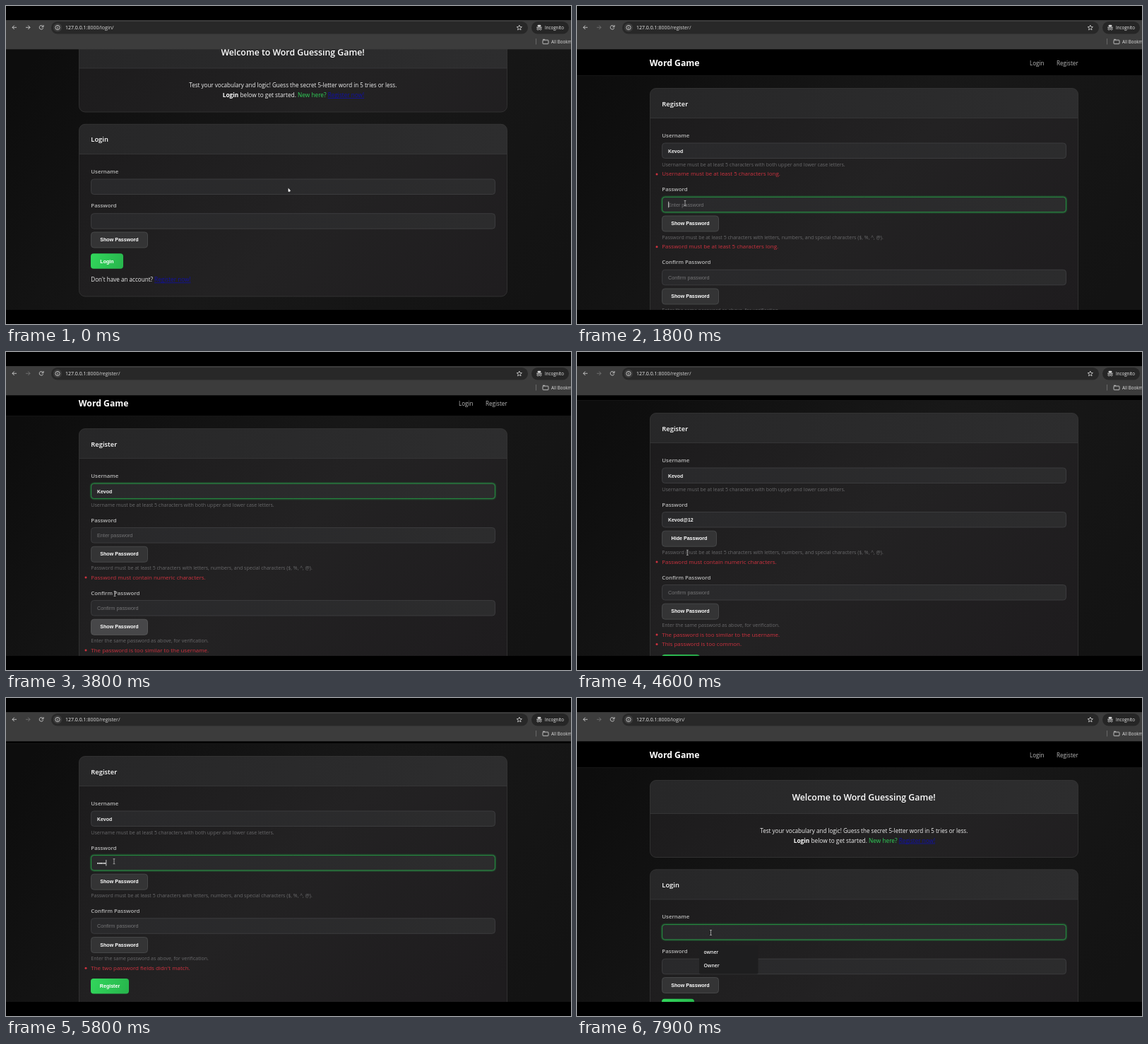
An HTML page with a canvas that plays this animation: 800x450 px, repeating every 8000 ms.

```html
<!DOCTYPE html>
<html lang="en">
<head>
<meta charset="utf-8">
<title>Word Game</title>
<style>
html, body { margin: 0; width: 100%; height: 100%; overflow: hidden; background: #000; }
canvas { display: block; width: 800px; height: 450px; }
</style>
</head>
<body>
<canvas id="stage" width="800" height="450"></canvas>
<script>
const ctx = document.getElementById('stage').getContext('2d');
const UI = '"Open Sans", "Noto Sans", sans-serif';
const FORM = '"Liberation Sans", Arial, sans-serif';
const RED = '#cf323f', GREEN = '#30d158', LABEL = '#b8b8b8', HELP = '#69696b', BLUE = '#1010a8';

const LOOP = 8000, OPEN = 200, DONE = 7400;
const KEY = 46, PAUSE = 110;    // ms per typed character, ms from click to first key
const TRAVEL = 120, LAG = 150;  // pointer travel time, how long a hover lingers
const BOTTOM = 80;              // scroll offset that reveals the submit button
const USER = 'Kevod', SECRET = USER + '@12';

// Each try at the form: when it loads, when each control is clicked, how far it scrolls.
const TRIES = [
  { from: OPEN, pw: 350, again: 480, words: ['Kevo', 'Kevo'], errors: {} },
  { from: 800, user: 1100, pw: 1720, show1: 2260, again: 2380, show2: 2740, rest: [2890, 200, 375],
    words: [USER, USER],
    errors: {
      user: 'Username must be at least 5 characters long.',
      pw: 'Password must be at least 5 characters long.',
      again: ['This password is too short.']
    } },
  { from: 3200, first: [3790, 154, 342], scroll: 3700, down: 30,
    pw: 4000, show1: 4560, again: 4680, show2: 5150, rest: [5290, 151, 390],
    words: [SECRET, SECRET.slice(0, -1)],
    errors: {
      pw: 'Password must contain numeric characters.',
      again: ['The password is too similar to the username.', 'This password is too common.']
    } },
  { from: 5400, scroll: 5420, down: 34, pw: 5450, again: 6450, words: [SECRET, SECRET],
    errors: { again: ["The two password fields didn't match."] } }
];
TRIES.forEach((a, i) => a.to = i + 1 < TRIES.length ? TRIES[i + 1].from : DONE);

// ---------- motion ----------
const clamp = v => Math.max(0, Math.min(1, v));
const ramp = (t, from, time) => { const k = clamp((t - from) / time); return k * k * (3 - 2 * k); };
const mix = (a, b, k) => a + (b - a) * k;
const typed = (word, t, click) => word.slice(0, Math.max(0, Math.floor((t - click - PAUSE) / KEY)));

function layout({ user, pw, again = [] }) {
  const y = { user: 183.2 };
  y.pw = y.user + (user ? 76.3 : 62.5);
  y.again = y.pw + (pw ? 103 : 89.3);
  y.button = y.again + 82.5 + 13.5 * again.length;
  return y;
}

function scrollAt(a, t) {
  const y = a.down ? a.down * ramp(t, a.scroll, 300) : 0;
  return mix(y, BOTTOM, ramp(t, a.to - 100, 80));
}

// Pointer stops [time, x, y], found from the places of the controls.
function stopsOf(a) {
  const y = layout(a.errors);
  const spots = {
    user: [153, y.user + 19.5], pw: [153, y.pw + 19.5], show1: [155, y.pw + 48],
    again: [160, y.again + 19.5], show2: [155, y.again + 48]
  };
  const clicks = Object.keys(spots).filter(k => a[k]).map(k =>
    [a[k], spots[k][0], spots[k][1] - (a.scroll <= a[k] ? a.down : 0)]);
  return [a.first, ...clicks, a.rest, [a.to - 20, 148, y.button + 11 - BOTTOM]].filter(Boolean);
}
const STOPS = [[0, 400, 260], [OPEN - 20, 236, 388], ...TRIES.flatMap(stopsOf), [DONE + 200, 189.5, 332]];

function pointerAt(t) {
  const i = STOPS.findIndex(s => s[0] > t);
  if (i < 1) return STOPS.at(i < 0 ? -1 : 0).slice(1);
  const [t0, x0, y0] = STOPS[i - 1], [t1, x1, y1] = STOPS[i];
  const time = Math.min(TRAVEL, t1 - t0);
  const k = ramp(t, t1 - time, time);
  return [mix(x0, x1, k), mix(y0, y1, k)];
}

// ---------- drawing helpers ----------
function text(s, x, y, size, color, { weight = 400, font = UI, align = 'left' } = {}) {
  ctx.font = `${weight} ${size}px ${font}`;
  ctx.textAlign = align;
  ctx.fillStyle = color;
  ctx.fillText(s, x, y + size * 0.36);
  return ctx.measureText(s).width;
}

function box(x, y, w, h, r, fill, stroke, line = 1) {
  ctx.beginPath();
  ctx.roundRect(x, y, w, h, r);
  if (fill) { ctx.fillStyle = fill; ctx.fill(); }
  if (stroke) { ctx.strokeStyle = stroke; ctx.lineWidth = line; ctx.stroke(); }
}

function path(points, color, width = 1, fill) {
  ctx.beginPath();
  points.forEach(([x, y]) => ctx.lineTo(x, y));
  if (fill) { ctx.closePath(); ctx.fillStyle = fill; ctx.fill(); }
  if (color) { ctx.strokeStyle = color; ctx.lineWidth = width; ctx.stroke(); }
}

const line = (x0, y0, x1, y1, color, width = 0.8) => path([[x0, y0], [x1, y1]], color, width);

function ring(x, y, r, color, from = 0, to = 7) {
  ctx.beginPath();
  ctx.arc(x, y, r, from, to);
  ctx.strokeStyle = color;
  ctx.lineWidth = 0.8;
  ctx.stroke();
}

function shade(x0, y0, x1, y1, ...colors) {
  const g = ctx.createLinearGradient(x0, y0, x1, y1);
  colors.forEach((c, i) => g.addColorStop(i / (colors.length - 1), c));
  return g;
}

// ---------- page parts ----------
const mouse = {};

// Notes which cursor an area asks for; true while it is hovered.
function hot(x, y, w, h, kind) {
  const inside = ([px, py]) => px >= x && px <= x + w && py >= y && py <= y + h;
  if (inside(mouse.now)) mouse.kind = kind;
  if (inside(mouse.before)) mouse.last = kind;
  return inside(mouse.now) || inside(mouse.before);
}

function card(y, bottom, head) {
  const h = bottom - y;
  box(103.5, y, 606, h, 8.5, shade(103, y, 560, y + 460, '#1c1b1c', '#232223', '#1e1c1e'));
  box(103.5, y, 606, head, [8.5, 8.5, 0, 0], shade(103, y, 710, y + 80, '#272728', '#2d2d2e'));
  line(103.5, y + head, 709.5, y + head, '#39393a');
  box(103.5, y, 606, h, 8.5, null, '#363637', 0.8);
}

function input(y, value, { hint = '', focus, caret } = {}) {
  hot(120, y, 573, 22, 'beam');
  box(120.5, y + 0.5, 572, 21.5, 4, shade(120, y, 692, y + 22, '#29292b', '#2c2c2d'), '#3e3e40', 0.9);
  if (focus) {
    box(120, y, 573, 22.5, 4.5, null, 'rgba(35,130,62,.28)', 3);
    box(120.5, y + 0.5, 572, 21.5, 4, null, '#24893f', 1);
  }
  const w = value
    ? text(value, 129, y + 11.5, 6.95, '#f4f4f4', { font: FORM, weight: 700 })
    : text(hint, 129, y + 11.5, 7.25, '#747476', { font: FORM });
  const x = value ? 129.7 + w : 129.7;
  if (caret) line(x, y + 7, x, y + 15.5, '#eee');
}

const buttonText = (s, x, y) => text(s, x, y, 7.1, '#fff', { font: FORM, weight: 700, align: 'center' });

function toggle(y, shown) {
  const w = shown ? 77 : 80;
  const lit = hot(120, y, w, 22, 'hand');
  box(120.5, y + 0.5, w, 22, 4, lit ? '#474749' : '#343435', lit ? '#58585a' : '#494a4b', 0.9);
  buttonText(shown ? 'Hide Password' : 'Show Password', 120.5 + w / 2, y + 11);
}

function submit(s, y, w) {
  hot(120, y, w, 21.5, 'hand');
  box(120, y, w, 21.5, 4, shade(120, y, 120 + w, y + 21, '#32d75c', '#27b44c'));
  buttonText(s, 120 + w / 2, y + 10.7);
}

function label(s, y) {
  const w = text(s, 120.3, y, 7.85, LABEL, { weight: 600 });
  hot(120, y - 5, w, 10, 'beam');
}

const heading = (s, y) => text(s, 120.3, y, 9.4, '#fff', { weight: 600 });
const help = (s, y) => text(s, 120.3, y, 7.03, HELP);

function error(s, y) {
  box(111.5, y - 1.2, 3, 3, 1.5, RED);
  text(s, 120.3, y, 7.98, RED);
}

function link(s, x, y) {
  const w = text(s, x, y, 8.2, BLUE);
  line(x, y + 4.2, x + w, y + 4.2, BLUE);
  hot(x, y - 6, w, 12, 'hand');
}

function footnote(s, action, y) {
  link(action, 120.3 + text(s, 120.3, y, 8.12, '#efefef'), y);
}

function navbar() {
  ctx.fillStyle = '#000';
  ctx.fillRect(0, 0, 800, 98);
  line(0, 98.5, 800, 98.5, '#191919');
  text('Word Game', 102.8, 81, 12.2, '#fff', { weight: 700 });
  text('Login', 641, 81, 8.1, '#bcbcbc');
  text('Register', 679, 81, 8.1, '#bcbcbc');
}

function loginPage(t) {
  card(116.5, 225.5, 47);
  text('Welcome to Word Guessing Game!', 406, 140.8, 12.3, '#fff', { weight: 600, align: 'center' });
  text('Test your vocabulary and logic! Guess the secret 5-letter word in 5 tries or less.',
    406.3, 188, 8.08, '#f0f0f0', { align: 'center' });
  let x = 306.8;
  x += text('Login', x, 201.8, 8.3, '#fff', { weight: 700 });
  x += text(' below to get started. ', x, 201.8, 8.3, '#f0f0f0');
  x += text('New here? ', x, 201.8, 8.3, GREEN);
  link('Register now!', x, 201.8);

  card(242.8, 486.5, 42.2);
  heading('Login', 264.5);
  label('Username', 309.3);
  input(320, '', { focus: t > DONE + 100 });
  label('Password', 358);
  input(368.7, '');
  toggle(395, false);
  submit('Login', 425.8, 46);
  footnote("Don't have an account? ", 'Register now!', 463);

  if (t > DONE + 300) {
    box(173, 350, 83.5, 40.5, 2, '#1e1e1f');
    ['owner', 'Owner'].forEach((s, i) => text(s, 179.5, 359.5 + 19.2 * i, 6.8, '#f4f4f4', { weight: 600 }));
  }
}

function registerPage(a, t) {
  const e = a.errors, y = layout(e);
  const clicked = ['user', 'pw', 'show1', 'again', 'show2'].filter(k => a[k] <= t).pop();
  const mask = (word, click, show) => {
    const s = typed(word, t, click);
    return t >= show ? s : '•'.repeat(s.length);
  };
  const field = (id, value, hint) =>
    input(y[id] + 10.3, value, { hint, focus: (clicked || 'user') === id, caret: clicked === id });

  card(116.5, y.button + 61, 42);
  heading('Register', 138.5);

  label('Username', y.user);
  const name = USER.slice(0, a === TRIES[0] || t < a.user + 200 ? 4 : 5);
  field('user', a === TRIES[0] ? typed(name, t, a.from - PAUSE) : name, 'Enter username');
  help('Username must be at least 5 characters with both upper and lower case letters.', y.user + 41.2);
  if (e.user) error(e.user, y.user + 54.4);

  label('Password', y.pw);
  field('pw', mask(a.words[0], a.pw, a.show1), 'Enter password');
  toggle(y.pw + 37, t >= a.show1);
  help('Password must be at least 5 characters with letters, numbers, and special characters ($, %, ^, @).', y.pw + 67.8);
  if (e.pw) error(e.pw, y.pw + 81);

  label('Confirm Password', y.again);
  field('again', mask(a.words[1], a.again, a.show2), 'Confirm password');
  toggle(y.again + 37, t >= a.show2);
  help('Enter the same password as above, for verification.', y.again + 67.8);
  (e.again || []).forEach((s, i) => error(s, y.again + 81 + 13.5 * i));

  submit('Register', y.button, 54);
  footnote('Already have an account? ', 'Login now', y.button + 37);
}

// ---------- browser frame ----------
function arrow(x, dir, color) {
  line(x - 3 * dir, 30.3, x + 3 * dir, 30.3, color);
  path([[x + 0.3 * dir, 27.6], [x + 3 * dir, 30.3], [x + 0.3 * dir, 33]], color, 0.9);
}

function browser(page, forward) {
  const ink = '#d8d8d8';
  ctx.fillStyle = '#000';
  ctx.fillRect(0, 0, 800, 20);
  ctx.fillRect(0, 430, 800, 20);
  ctx.fillStyle = '#3c3c3c';
  ctx.fillRect(0, 20, 800, 41.3);
  box(64, 22, 675, 17.5, 8.7, '#282828');
  box(744, 22, 53, 17.5, 8.7, '#262626');

  arrow(12, -1, ink);
  arrow(31, 1, forward ? ink : '#777');
  ring(50, 30.3, 2.8, ink, 0.3, 5.6);
  path([[53, 27], [53, 29.6], [50.4, 29.6]], ink, 0.9);

  box(67, 24.5, 12, 12, 6, '#3c3c3c');
  ring(73, 30.5, 3.1, ink);
  line(73, 30, 73, 32.3, ink);
  line(73, 28.5, 73, 29.3, ink);
  const w = text('127.0.0.1', 84, 30.8, 7, '#f0f0f0');
  text(`:8000/${page}/`, 84 + w, 30.8, 7, '#d6d6d6');

  const star = Array.from({ length: 11 }, (_, i) => {
    const angle = i * Math.PI / 5 - Math.PI / 2, r = i % 2 ? 1.7 : 3.8;
    return [726.8 + r * Math.cos(angle), 30.8 + r * Math.sin(angle)];
  });
  path(star, ink, 0.8);

  box(752.7, 26.8, 4.6, 2.6, 0.8, ink);
  line(751, 30.2, 759, 30.2, ink);
  for (const side of [-1.8, 1.8]) ring(755 + side, 32.6, 1.3, ink);
  text('Incognito', 763, 30.5, 6.2, '#ececec');

  line(750.5, 46, 750.5, 54.5, '#747474');
  box(760, 48.2, 8, 5.4, 0.8, null, ink, 0.8);
  line(760, 47.3, 763.2, 47.3, ink);
  text('All Bookmarks', 772, 50.4, 6.2, '#e0e0e0');
}

function pointer([x, y], kind) {
  if (kind === 'beam') {
    line(x, y - 3.5, x, y + 3.5, '#b4b4b4');
    for (const d of [-3.5, 3.5]) line(x - 1.4, y + d, x + 1.4, y + d, '#b4b4b4');
  } else if (kind === 'hand') {
    box(x - 1.2, y - 4, 1.7, 6, 0.8, '#fff', '#111', 0.4);
    box(x - 2.2, y - 0.8, 5.2, 5, 1.6, '#fff');
  } else {
    path([[x - 0.7, y - 3], [x - 0.7, y + 2.8], [x + 1.4, y + 3.2], [x + 3.3, y + 1.2]], '#111', 0.5, '#fff');
  }
}

function draw(t) {
  const a = TRIES.find(a => t >= a.from && t < a.to);
  const scroll = a ? scrollAt(a, t) : t < OPEN ? 75.5 : 0;
  const onPage = ([x, y]) => [x, y + scroll];
  const at = pointerAt(t);
  Object.assign(mouse, { now: onPage(at), before: onPage(pointerAt(t - LAG)), kind: '', last: '' });

  ctx.save();
  ctx.beginPath();
  ctx.rect(0, 61, 800, 369);
  ctx.clip();
  ctx.fillStyle = shade(100, 0, 700, 480, '#0d0d0d', '#181818', '#131313');
  ctx.fillRect(0, 61, 800, 369);
  ctx.translate(0, -scroll);
  navbar();
  if (a) registerPage(a, t); else loginPage(t);
  ctx.restore();

  browser(a ? 'register' : 'login', t < OPEN);
  const moved = t > STOPS[1][0] - TRAVEL;
  pointer(at, moved ? mouse.kind || mouse.last : 'arrow');
}

const start = performance.now();
function frame() {
  draw((performance.now() - start) % LOOP);
  requestAnimationFrame(frame);
}
frame();
</script>
</body>
</html>
```
